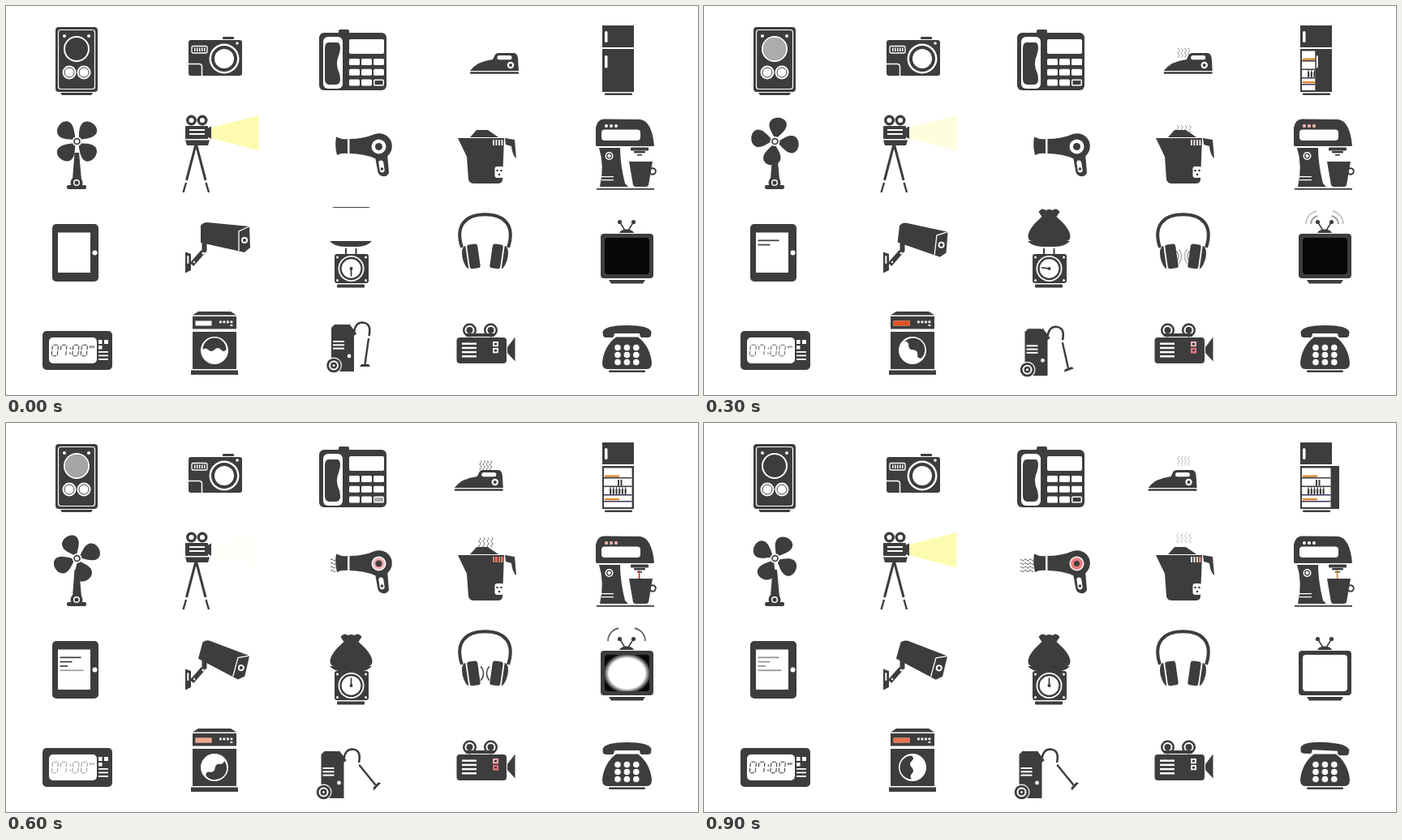
An HTML page with a canvas for the animation above (0.96 s loop, 853 px wide and 480 px high).

```html
<!DOCTYPE html>
<html lang="en">
<head>
<meta charset="utf-8">
<title>Appliances</title>
<style>
html, body { margin: 0; width: 100%; height: 100%; overflow: hidden; background: #fff; }
canvas { display: block; }
</style>
</head>
<body>
<canvas id="stage" width="853" height="480"></canvas>
<script>
const g = document.getElementById('stage').getContext('2d');
const DARK = '#3e3d3e', WHITE = '#fff', LOOP = 960, STEP = 60;
let T = 0;

// Progress 0..1 between two times: linear, eased, and eased in then out
const linear = (from, to) => Math.min(1, Math.max(0, (T - from) / (to - from)));
const ramp = (from, to) => (1 - Math.cos(Math.PI * linear(from, to))) / 2;
const pulse = (on, full, off, gone) => ramp(on, full) * (1 - ramp(off, gone));

function repeat(n, draw) { for (let i = 0; i < n; i++) draw(i); }
function grid(x, y, dx, dy, draw) { repeat(9, i => draw(x + i % 3 * dx, y + Math.floor(i / 3) * dy)); }
function fill(d, c = DARK) { g.fillStyle = c; g.fill(new Path2D(d)); }
function stroke(d, w, c = DARK) { g.strokeStyle = c; g.lineWidth = w; g.stroke(new Path2D(d)); }
function rect(x, y, w, h, r = 0, c = DARK) {
  g.fillStyle = c; g.beginPath(); g.roundRect(x, y, w, h, r); g.fill();
}
function frame(x, y, w, h, r, lw, c = WHITE) {
  g.strokeStyle = c; g.lineWidth = lw; g.beginPath(); g.roundRect(x, y, w, h, r); g.stroke();
}
function disc(x, y, r, c = DARK) { g.fillStyle = c; g.beginPath(); g.arc(x, y, r, 0, 7); g.fill(); }
function arc(x, y, r, from, to, w, c = DARK) {
  g.strokeStyle = c; g.lineWidth = w; g.beginPath();
  g.arc(x, y, r, from * Math.PI / 180, to * Math.PI / 180); g.stroke();
}
function ring(x, y, r, w, c = WHITE) { arc(x, y, r, 0, 360, w, c); }
function at(x, y, deg, draw) {
  g.save(); g.translate(x, y); g.rotate(deg * Math.PI / 180); draw(); g.restore();
}
function fade(alpha, draw) { g.save(); g.globalAlpha = alpha; draw(); g.restore(); }
function wave(length) {
  let d = 'M0 0';
  for (let s = 1; s <= length; s++) d += `L${s} ${Math.sin(s * 1.05 + T / 200) * 1.1}`;
  stroke(d, 1, '#555');
}
function steam(x, gap, top) {
  const y = top - 14 * linear(120, 900);
  fade(pulse(120, 420, 660, 1080), () => repeat(4, i => at(x + i * gap, y, 90, () => wave(12))));
}

function speaker() {
  rect(61, 26, 52, 80, 4);
  fill('M67 107H107L105 110H69Z');
  frame(64.5, 29.5, 45, 73, 3, 1.2);
  for (const x of [72, 102]) disc(x, 37, 2, WHITE);
  disc(87, 53, 16, WHITE);
  disc(87, 53, 14);
  fade(pulse(0, 120, 540, 900), () => disc(87, 53, 14, '#acacac'));
  for (const x of [78, 96]) { disc(x, 82, 8.5, WHITE); ring(x, 82, 6, 1, DARK); }
}

function camera() {
  rect(225, 42, 66, 44, 3);
  rect(267, 38, 14, 3, 1);
  frame(229, 49.5, 19, 8.5, 2, 1.3);
  repeat(5, i => rect(232 + i * 3, 51.5, 1.5, 4.5, 0, WHITE));
  stroke('M225 71.5H238Q241.5 71.5 241.5 75V86', 1.5, WHITE);
  disc(269, 65, 18.5, WHITE); disc(269, 65, 16); disc(269, 65, 12, WHITE);
  disc(285, 46, 1.8, WHITE);
}

function deskPhone() {
  rect(410, 29, 13, 6, 2);
  rect(386, 33, 83, 71, 6);
  rect(391, 38, 24, 64, 6, WHITE);
  fill('M397 45H409Q412 46 412 52Q411 60 409 64Q407 71 409 78Q412 84 412 90Q412 97 407 97H398Q393 96 393 90V52Q393 46 397 45Z');
  rect(423, 41, 43, 18, 2, WHITE);
  grid(423, 65, 15, 12.8, (x, y) => rect(x, y, 13, 8, 1.5, WHITE));
  rect(454.5, 92, 10, 5);
  fade(pulse(480, 600, 720, 900), () => rect(454.5, 92, 10, 5, 0, '#aaa'));
}

function iron() {
  steam(585, 4.2, 55);
  at(-24.5 * ramp(60, 840), 0, 0, () => {
    fill('M572 80Q581 68 600 66L602 62Q603 58 608 58H626Q630 58 631 64L632 80Z');
    rect(572, 81.3, 60, 2.5, 1);
    rect(605.5, 61, 18, 5.3, 2.5, WHITE);
    disc(622, 73, 4.2, WHITE); disc(622, 73, 2);
  });
}

function fridge() {
  rect(735, 24, 39, 27);
  rect(735, 53, 39, 53);
  rect(738, 107.5, 34, 2.5, 1);
  rect(738, 31, 3.5, 14, 1.7, WHITE);
  const open = linear(0, 640), edge = 735 + 39 * open;
  g.save();
  g.beginPath(); g.rect(735, 53, edge - 735, 53); g.clip();
  rect(737, 55.5, 35.5, 48.5, 0, WHITE);
  for (const y of [67, 77.5, 88, 96]) rect(737, y, 35.5, 1.5, 0, y > 80 ? '#3b3660' : DARK);
  for (const y of [64.5, 93]) rect(738, y, 18, 2.3, 0, '#d9822b');
  repeat(2, i => rect(754 + i * 3.5, 70, 2, 7.5));
  repeat(6, i => { rect(744 + i * 3.7, 81, 2.2, 7, 1); rect(744.6 + i * 3.7, 79, 1, 3); });
  g.restore();
  rect(774, 53, 9 * linear(720, 900), 53);
  if (open < 1) rect(edge + 3 * (1 - open), 61, 3.5 * (1 - open), 15.5, 1.5, WHITE);
}

function fan() {
  fill('M84.5 181H90L93 214H82Z');
  disc(87, 218, 7.5);
  rect(75, 221, 24, 5, 2);
  ring(87, 218, 3.3, 1.5);
  repeat(4, i => at(87.5, 167, 45 + T / LOOP * 180 + i * 90,
    () => fill('M0 -2C-3 -8 -11.5 -13 -11 -21C-10 -30 5 -33 9.5 -25C13 -17 4 -9 0 -2Z')));
  disc(87.5, 167, 6, WHITE); disc(87.5, 167, 4.3); disc(87.5, 167, 2.6, WHITE);
}

function projector() {
  fade(1 - pulse(180, 400, 570, 760), () => fill('M253 150L311.5 135V178.5L253 163Z', '#fdfbb0'));
  for (const x of [228.5, 242]) ring(x, 141, 4.8, 3.4, DARK);
  rect(221, 148, 28, 16, 1);
  for (const y of [152, 157]) rect(226, y, 19, 2, 0, WHITE);
  fill('M248 151L253 148.5V164L248 161Z');
  fill('M221 165.5H251L249 172H223Z');
  stroke('M234 171L222.5 215M234.5 171L246 215', 3);
  stroke('M222 218L218.5 230M246.5 218L250 230', 2.4);
}

function dryer() {
  const blow = 16 * linear(420, 900);
  repeat(4, i => at(406 - blow, 169 + i * 4.5, 0, () => wave(blow)));
  fill('M407 161.5Q414 165 421 164V182Q414 181 408 184Q405 173 407 161.5Z');
  fill('M423.5 164Q440 164 455 158L459 189Q440 182 423.5 182Z');
  disc(460, 173, 15.8);
  fill('M455 186L470 182L472 206Q470 211 464 210Q459 209 458 203Z');
  disc(459.5, 173.5, 9, WHITE);
  disc(459.5, 173.5, 4.5);
  fade(linear(300, 840), () => ring(459.5, 173.5, 5.5, 4, '#ea7f7c'));
  at(463, 198, -8, () => { rect(-3, -7.5, 6, 15, 3, WHITE); disc(0, 3, 1.8); });
}

function kettle() {
  steam(584, 5, 150);
  fill('M572 162L580 153H594L607 162Z');
  fill('M557 163H614L612 214Q612 219 606 219H577Q571 219 570 214L568 186Z');
  fill('M615 163L627 165L629 188Q624 184 623 173L616 171Z');
  repeat(4, i => {
    rect(600 + i * 3.5, 165, 1.8, 7, 0, WHITE);
    fade(pulse(240, 560, 660 + i * 60, 840 + i * 60), () => rect(600 + i * 3.5, 165, 1.8, 7, 0, '#ef7a4d'));
  });
  rect(602.5, 198, 11, 14, 3, WHITE);
  for (const x of [605.5, 610.5]) disc(x, 203, 1.3);
  disc(608, 208, 1.3);
}

function coffee() {
  fill('M727 172V150Q729 139 738 139.5L782 140Q796 142 799 172Q799 173 797 173H728Z');
  rect(734, 152.5, 48, 13.5, 4, WHITE);
  repeat(3, i => {
    disc(740 + i * 6, 148, 2, WHITE);
    fade(pulse(120, 300, 660, 900), () => disc(740 + i * 6, 148, 2, '#eaaba4'));
  });
  fill('M731 175H757Q757 195 763 219L767 223H732Q738 197 731 175Z');
  disc(743.5, 185, 5, WHITE); ring(743.5, 185, 2.8, 1.3, DARK);
  for (const y of [210, 214]) rect(734, y, 15, 1.3, 0, WHITE);
  rect(728, 225, 71, 1.8);
  rect(770, 174.5, 22, 4, 1); rect(774, 179, 14, 2.5, 1); rect(778, 183, 6, 1.6);
  rect(779.7, 182, 1.8, 10 * linear(480, 600), 0, `hsl(${40 * linear(600, 900)} 50% 50%)`);
  ring(797, 204, 3.8, 2, DARK);
  fill('M768 192H797L792 221Q791 223 789 223H776Q774 223 773 221Z');
}

function tablet() {
  rect(57, 269, 57, 71, 5);
  rect(64, 279.5, 40, 49.5, 0, WHITE);
  disc(109.5, 304.5, 3, WHITE);
  [26, 15, 9.5, 29].forEach((w, i) => fade(ramp(i * 180, i * 180 + 120) * (1 - linear(720, 1140)),
    () => rect(66.5, 288.5 + i * 5.3, w, 1.7)));
}

function cctv() {
  fill('M221 303.5L228 306V326L221 329.5Z');
  stroke('M229 319L243 303', 6);
  rect(241.5, 290, 6, 14, 2);
  rect(223.3, 308, 2, 10, 1, WHITE);
  disc(243, 305, 1.5, WHITE); disc(232, 316, 1.2, WHITE);
  at(243, 280, 15.5 * ramp(0, 660), () => {
    fill('M-3 -9Q0 -13 5 -13L57 -8L58 18L51 24L-3 12Z');
    stroke('M44 22V-2L57 -8', 1.3, WHITE);
    disc(51, 9, 4, WHITE); disc(51, 9, 2.1);
  });
}

function scale() {
  const tray = 290 + 10 * linear(300, 420);
  g.save();
  g.beginPath(); g.rect(390, 248, 70, 80); g.clip();
  at(425.5, tray - 41 * (1 - linear(60, 300)), 0, () => fill(
    'M-26 -6C-26 -14 -16 -24 -9 -30L-13 -36Q-9 -42 -4 -38Q0 -40 4 -38Q9 -42 13 -36L9 -30C16 -24 26 -14 26 -6Q26 0 20 0H-20Q-26 0 -26 -6Z'));
  g.restore();
  for (const x of [418, 430.5]) rect(x, 299, 2, 7);
  at(425, tray, 0, () => fill('M-26 0H26Q20 7 8 7H-8Q-20 7 -26 0Z'));
  rect(405, 306, 42, 36, 3);
  rect(408, 343.5, 34, 4, 1);
  for (const x of [408.5, 443.5]) for (const y of [310, 338.5]) disc(x, y, 1.5, WHITE);
  disc(425.5, 324, 16, WHITE); ring(425.5, 324, 13, 2.4, DARK);
  at(425.5, 324, 180 + 180 * linear(0, 560), () => { rect(-.9, -9.5, 1.8, 11); disc(0, 0, 2); });
}

function headphones() {
  stroke('M562 298C553 270 567 257.3 590.5 257.3C614 257.3 628 270 619 298', 4);
  for (const side of [1, -1]) {
    g.save();
    g.translate(590.5, 309); g.scale(side, 1);
    at(-14.5, 0, -8, () => {
      rect(-6, -15, 13, 30, 3);
      fill('M-7.8 -14.5Q-14 -13 -13.5 0Q-12 12 -7.8 14.5Z');
    });
    fade(pulse(60, 420, 420, 600) * .7, () => arc(-15, 0, 9.5, -45, 45, 1.4));
    fade(pulse(120, 540, 600, 800) * .9, () => arc(-15, 0, 13, -42, 42, 1.6));
    g.restore();
  }
}

function tv() {
  rect(733, 281, 65, 55, 4);
  fill('M743 338H788L785 342.5H746Z');
  fill('M756 280Q758 275.5 765 275.5Q772 275.5 774 280Z');
  stroke('M763 277L756.5 266.5M767 277L773.5 266.5', 1.5);
  disc(756.5, 266.5, 2.6); disc(773.5, 266.5, 2.6);
  for (const [x, a] of [[758, 180], [772, 280]]) {
    fade(pulse(0, 360, 420, 600) * .6, () => arc(x, 269, 10, a, a + 80, 1.8));
    fade(pulse(120, 540, 600, 820) * .8, () => arc(x, 269, 16, a, a + 80, 1.8));
  }
  const r = 50 * linear(480, 720);
  g.save();
  g.beginPath(); g.roundRect(738, 286, 55, 45, 4); g.clip();
  rect(738, 286, 55, 45, 0, '#080808');
  g.translate(765.5, 309); g.scale(1.18, 1);
  const glow = g.createRadialGradient(0, 0, r * .75, 0, 0, r);
  glow.addColorStop(0, WHITE); glow.addColorStop(1, '#fff0');
  rect(-30, -30, 60, 60, 0, glow);
  g.restore();
}

function clock() {
  const ZERO = 'M1 0H6M7 1V6M7 7.5V12.5M1 13.5H6M0 7.5V12.5M0 1V6';
  const SEVEN = 'M1 0H6M7 1V6M7 7.5V12.5M0 1V6';
  rect(45, 401, 86, 48, 5);
  rect(53, 409, 59, 32, 5, WHITE);
  fade(1 - .5 * pulse(120, 480, 720, 840), () => {
    [ZERO, SEVEN, ZERO, ZERO].forEach((digit, i) => {
      g.save();
      g.transform(1, 0, -.1, 1, 57.5 + i * 10.5 + (i > 1 ? 4.5 : 0), 418.3);
      stroke(digit, 1.1);
      g.restore();
    });
    disc(79.5, 422.5, .9); disc(79, 428.5, .9);
    g.fillStyle = DARK; g.font = 'bold 4px Arial, sans-serif'; g.fillText('AM', 102.5, 421.5);
  });
  rect(114, 412, 4.5, 5, 0, WHITE); rect(121, 412, 5, 5, 0, WHITE); rect(114, 419, 4.5, 4.5, 0, WHITE);
  repeat(3, i => rect(114, 426 + i * 4.5, 12, 1.8, 0, WHITE));
}

function washer() {
  fill('M237 377H277L284 381.5H230Z');
  rect(230, 383, 54, 15.5);
  rect(233.5, 388.5, 20, 6, 0, WHITE);
  fade(pulse(0, 240, 480, 720) + .8 * ramp(720, 900), () => rect(233.5, 388.5, 20, 6, 0, '#e0511f'));
  repeat(4, i => rect(263 + i * 4.5, 388.5, 2.8, 2.8, 0, WHITE));
  rect(276.5, 393, 2.8, 2, 0, WHITE);
  rect(230, 402, 54, 46);
  rect(228, 449.5, 58, 5.5);
  disc(257, 425, 17, WHITE);
  at(257, 425, 180 + 270 * (T / 900) ** 1.6,
    () => fill('M-14.5 1Q-11 -3 -8 1Q-4 5 0 1Q4 -3 8 1Q11 4 14.5 1A14.5 14.5 0 0 1 -14.5 1Z'));
}

function vacuum() {
  const pull = ramp(120, 510);
  at(-12.5 * pull, 12 * pull, 0, () => {
    fill('M401 397L405 393H421L429 406V451H401Z');
    stroke('M421 394L430 406', 5.5);
    stroke('M429 402Q431 390.5 439 390.5Q451 391 447.5 407', 2.6);
    repeat(3, i => rect(403, 413 + i * 4.3, 14, 2, 0, WHITE));
    disc(423, 432, 2.4, WHITE);
    disc(404, 443.5, 10, WHITE); disc(404, 443.5, 8.8); ring(404, 443.5, 5, 2); disc(404, 443.5, 1.5, WHITE);
    at(447, 409, -47 * pull, () => {
      stroke('M0 1L-4.5 33', 2.4);
      fill('M-11 36L-9 33H0L2 36Z');
    });
  });
}

function camcorder() {
  for (const x of [571.5, 597.5]) { disc(x, 400, 8.5); ring(x, 400, 5, 2); }
  rect(567, 404, 35, 4);
  rect(555.5, 409, 61.5, 32, 4);
  fill('M618 421L627.5 408.5V438.5L618 428Z');
  repeat(4, i => rect(562, 415.5 + i * 5.2, 18, 2.4, 0, WHITE));
  repeat(2, i => {
    const y = 414.8 + i * 8;
    frame(601, y, 5, 4.6, 0, 1.8);
    fade(pulse(60, 360, 660, 860) * (i + 1) / 2, () => frame(601, y, 5, 4.6, 0, 1.8, '#f0606a'));
  });
}

function telephone() {
  fill('M752 408.5H779Q794 420 796 440Q796 448 790 448H741Q735 448 735 440Q737 420 752 408.5Z');
  rect(743, 449.5, 45, 2.6, 1);
  grid(754, 421.5, 11.4, 9, (x, y) => disc(x, y, 3.8, WHITE));
  at(765.5, 401, 3 * ramp(660, 900), () => {
    const d = 'M-30 1Q-27 -7 0 -7Q27 -7 30 1L29.5 6Q29 8 26 8H18Q16 8 15.5 3H-15.5Q-16 8 -18 8H-26Q-29 8 -29.5 6Z';
    stroke(d, 2.5, WHITE); fill(d);
  });
}

const icons = [speaker, camera, deskPhone, iron, fridge, fan, projector, dryer, kettle, coffee,
  tablet, cctv, scale, headphones, tv, clock, washer, vacuum, camcorder, telephone];

function draw(now) {
  T = Math.floor(now % LOOP / STEP) * STEP;
  rect(0, 0, 853, 480, 0, WHITE);
  for (const icon of icons) icon();
  requestAnimationFrame(draw);
}
draw(0);
</script>
</body>
</html>
```
